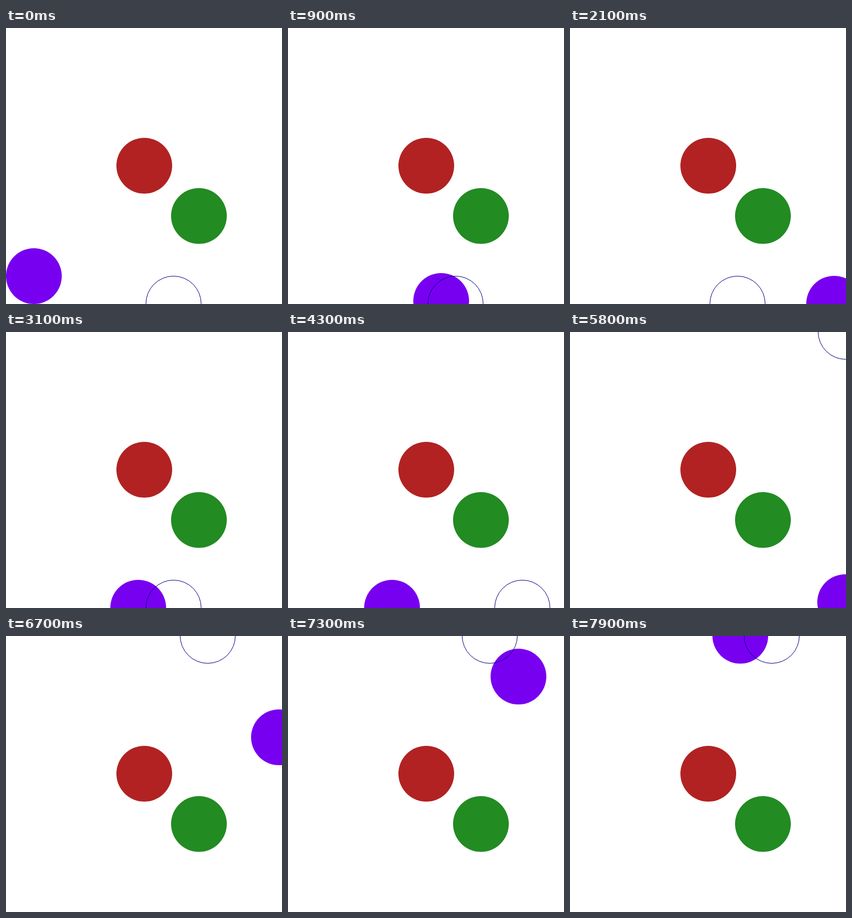
These frames come from a looping animation (500x500 px, 8000 ms). An HTML page:

```html
<!DOCTYPE html>
<html lang="en">
<head>
<meta charset="utf-8">
<title>Spring ball</title>
<style>
  html, body { margin: 0; width: 100%; height: 100%; overflow: hidden; background: #fff; }
  svg { display: block; width: 500px; height: 500px; }
</style>
</head>
<body>
<svg viewBox="0 0 500 500">
  <g transform="translate(0.5 -0.5)">
    <circle cx="250" cy="250" r="50.5" fill="#b22222"/>
    <circle cx="349" cy="341" r="50.5" fill="#228b22"/>
    <circle id="ball" r="50.5" fill="#7800f0"/>
    <circle id="goal" r="50" fill="none" stroke="#000080"/>
  </g>
</svg>
<script>
const SIZE = 500, STEP = 100, STEPS = 80;
const PULL = 0.00708, DRAG = 0.984816, SUBSTEPS = 2;
const ball = document.getElementById('ball');
const goal = document.getElementById('goal');

// The goal is dragged three times, each along a quarter ellipse.
const home = { x: 303, y: 500 };
const drags = [
  { start: 36, end: 42, x: 424, y: 500 },
  { start: 54, end: 58, x: 499, y: 0 },
  { start: 64, end: 66, x: 365, y: 0 }
];

const clamp = (v, lo, hi) => Math.min(hi, Math.max(lo, v));

function goalAt(n) {
  let { x, y } = home;
  for (const d of drags) {
    const a = clamp((n - d.start) / (d.end - d.start), 0, 1) * Math.PI / 2;
    x += (d.x - x) * Math.sin(a);
    y += (d.y - y) * (1 - Math.cos(a));
  }
  return { x, y };
}

// A damped spring pulls the ball to the goal; a moving goal stops the ball first.
function simulate() {
  const pos = { x: 50, y: 450 }, vel = { x: 0, y: 0 };
  const path = [{ ...pos }];
  for (let n = 1; n < STEPS; n++) {
    const aim = goalAt(n - 1);
    const dragged = drags.some(d => n - 1 > d.start && n - 1 <= d.end);
    for (const k of ['x', 'y']) {
      if (dragged) vel[k] = 0;
      for (let i = 0; i < SUBSTEPS; i++) {
        vel[k] = (vel[k] + (aim[k] - pos[k]) * PULL) * DRAG;
        pos[k] = clamp(pos[k] + vel[k], 0, SIZE);
      }
    }
    path.push({ ...pos });
  }
  return path;
}

function place(el, { x, y }) {
  el.setAttribute('cx', Math.round(x));
  el.setAttribute('cy', Math.round(y));
}

const path = simulate();
const begin = performance.now();

function draw() {
  const n = Math.floor((performance.now() - begin) / STEP) % STEPS;
  place(ball, path[n]);
  place(goal, goalAt(n));
  requestAnimationFrame(draw);
}
draw();
</script>
</body>
</html>
```
